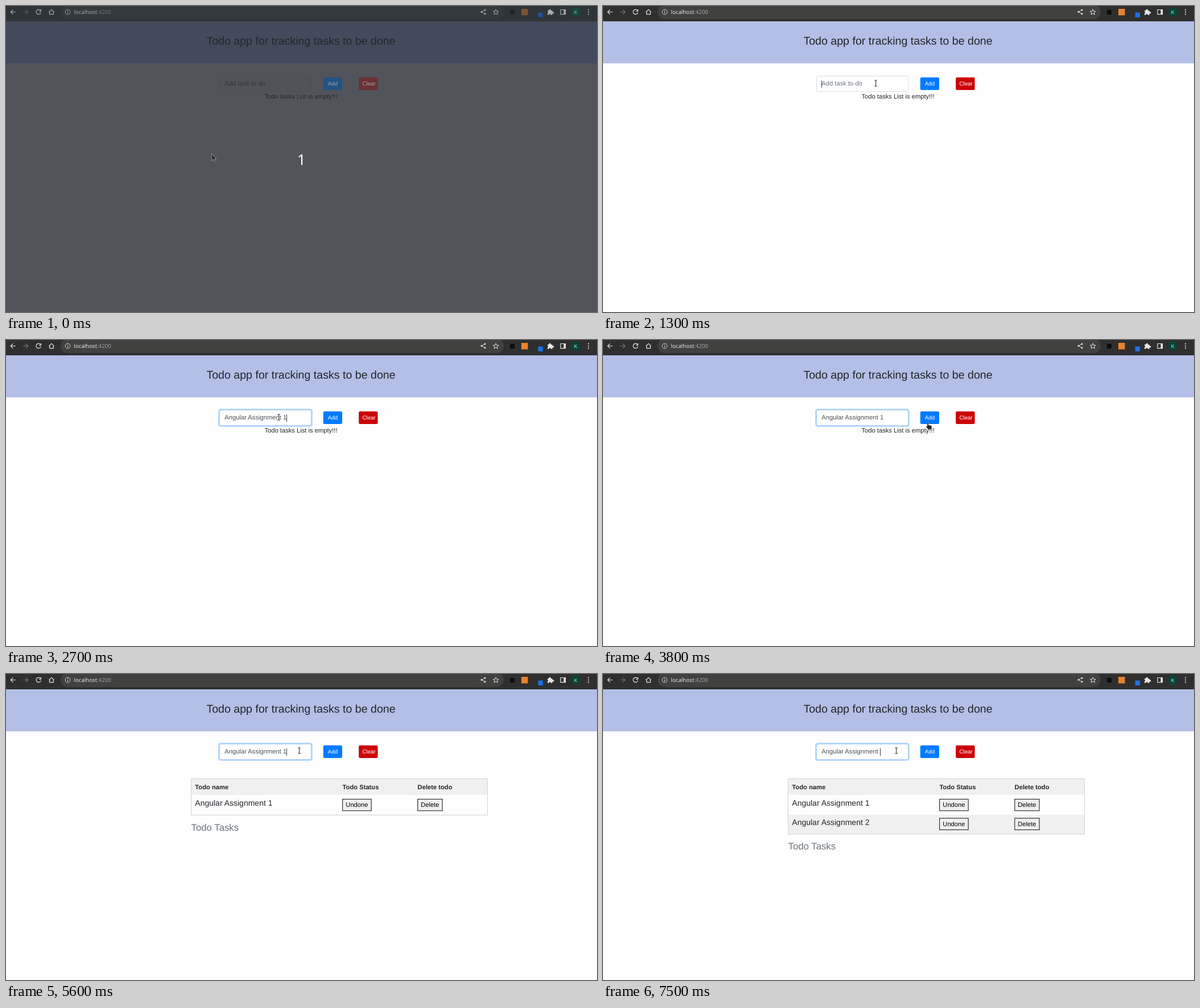
An HTML page for the animation above (8000 ms loop, 1039x539 px).

```html
<!DOCTYPE html>
<html lang="en">
<head>
<meta charset="utf-8">
<title>Todo app</title>
<style>
  html, body { margin: 0; width: 100%; height: 100%; overflow: hidden; }
  svg {
    display: block; width: 100%; height: 100%;
    font: 11.2px "Liberation Sans", Arial, sans-serif;
    text-rendering: geometricPrecision;
    --page: #fefefe; --bar: #2f2f2f; --pill: #414140; --icon: #e6e6e6; --faint: #777;
    --host: #f0f0f0; --port: #a8a8a8; --hero: #b3bfe6; --ink: #212529; --field: #fff;
    --edge: #ced4da; --hint: #6c757d; --add: #007bff; --clear: #cc0408; --label: #fff;
    --orange: #e8822e; --badge: #1a73e8; --avatar: #06463a; --black: #0c0c0c;
  }
  svg.dim {
    --page: #51545b; --bar: #2e3438; --pill: #34393d; --icon: #a9adaf; --faint: #565b5e;
    --host: #a9adaf; --port: #6d7275; --hero: #434a5b; --ink: #25282c; --field: #50535a;
    --edge: #4c4f56; --hint: #32353a; --add: #245284; --clear: #6b3236; --label: #9da3ab;
    --orange: #775438; --badge: #22508e; --avatar: #174840; --black: #202427;
  }
  .page { fill: var(--page); } .bar { fill: var(--bar); } .pill { fill: var(--pill); }
  .hero { fill: var(--hero); } .ink { fill: var(--ink); } .hint { fill: var(--hint); }
  .field { fill: var(--field); stroke: var(--edge); stroke-width: .8; }
  .add { fill: var(--add); } .clear { fill: var(--clear); }
  .label { fill: var(--label); font-size: 9.8px; }
  .line { fill: none; stroke: var(--icon); stroke-width: 1.2; }
  .faint { stroke: var(--faint); }
  .solid { fill: var(--icon); }
  .black { fill: var(--black); } .orange { fill: var(--orange); }
  .badge { fill: var(--badge); } .avatar { fill: var(--avatar); }
  .url { font: 9.7px "Open Sans", "Noto Sans", sans-serif; fill: var(--port); }
  .host { fill: var(--host); }
  .count { font: 26px "Noto Sans", sans-serif; fill: #fff; }
  .mid { text-anchor: middle; }
  .bold { font-weight: bold; }
  .frame { fill: none; stroke: #cfd2d5; }
  .stripe { fill: #f0f0f0; }
  .btn { fill: #efefef; stroke: #222; stroke-width: 1.1; }
  .task { font-size: 14px; }
  .pointer { fill: #2a2a2a; stroke: #fff; stroke-width: .9; stroke-linejoin: round; paint-order: stroke; }
  .halo { fill: none; stroke: #fff; stroke-width: 2.2; opacity: .8; }
  .beam { fill: none; stroke: #333; stroke-width: 1.1; }
</style>
</head>
<body>
<svg id="stage" viewBox="0 0 1039 539">
  <defs>
    <path id="stem" d="M-2.3-5.2Q-.5-5.2 0-4.4 .5-5.2 2.3-5.2M0-4.5V4.5M-2.3 5.2Q-.5 5.2 0 4.4 .5 5.2 2.3 5.2"/>
  </defs>
  <rect class="page" width="1039" height="539"/>

  <rect class="bar" width="1039" height="27"/>
  <rect class="pill" x="96" y="-2" width="779" height="25" rx="12.5"/>
  <path class="line" d="M17 10.5H8.4M12.4 6.3 8.2 10.5 12.4 14.7"/>
  <path class="line faint" d="M30 10.5H38.6M34.6 6.3 38.8 10.5 34.6 14.7"/>
  <path class="line" d="M60.4 7.6A4.2 4.2 0 1 0 61.3 11.5M61.4 5.8V9.2H58"/>
  <path class="line" d="M75.4 10.6 80 6.4 84.6 10.6M76.7 10V14.7H83.3V10"/>
  <circle class="line" cx="108.5" cy="10.5" r="4.4" style="stroke-width:.9"/>
  <path class="line" d="M108.5 10V13M108.5 7.8V8.9" style="stroke-width:1"/>
  <text class="url" x="119.5" y="14"><tspan class="host">localhost</tspan>:4200</text>
  <path class="line" d="M842 7 836 10.3 842 13.7" style="stroke-width:.9"/>
  <g class="solid">
    <circle cx="842" cy="7" r="1.5"/><circle cx="836" cy="10.3" r="1.5"/><circle cx="842" cy="13.7" r="1.5"/>
    <circle cx="1024" cy="6.6" r="1.1"/><circle cx="1024" cy="10.5" r="1.1"/><circle cx="1024" cy="14.4" r="1.1"/>
    <path d="M952 8H954.5A1.8 1.8 0 1 1 958 8H960.5V10.3A1.8 1.8 0 1 1 960.5 13.3V15.8H957.8A1.7 1.7 0 0 0 954.4 15.8H952V13A1.7 1.7 0 0 0 952 9.8Z"/>
    <path d="M980.5 6H984V15H980.5Z"/>
  </g>
  <path class="line" d="M861.2 5.8 862.6 9.1 866.1 9.3 863.4 11.6 864.3 15 861.2 13.1 858.1 15 859 11.6 856.3 9.3 859.8 9.1Z" style="stroke-width:1"/>
  <path class="line" d="M975 6.5H983.5V14.7H975Z"/>
  <rect class="black" x="886" y="7" width="8" height="8"/>
  <rect class="orange" x="906" y="5" width="11.5" height="11.5"/>
  <rect class="badge" x="935.5" y="11.5" width="8.5" height="8.5" rx="1"/>
  <circle class="avatar" cx="1001.5" cy="10.5" r="8"/>
  <text class="solid mid" x="1001.5" y="13.6" style="font-size:8.5px">K</text>

  <rect class="hero" y="27" width="1039" height="74"/>
  <text class="ink mid" x="518.5" y="68" style="font-size:19.6px">Todo app for tracking tasks to be done</text>

  <rect id="inputRing" x="374.2" y="122.2" width="163.6" height="29.6" rx="3.6" fill="none" stroke="#b8daff" stroke-width="2.6"/>
  <rect class="field" x="375.4" y="123.4" width="161.2" height="27.2" rx="2.6"/>
  <rect id="inputEdge" x="375.4" y="123.4" width="161.2" height="27.2" rx="2.6" fill="none" stroke="#9dcbff" stroke-width=".8"/>
  <text id="value" x="384.3" y="140.3"></text>
  <rect id="caret" y="131" width="1" height="13" fill="#333a40"/>
  <rect id="addRing" x="556.2" y="124.2" width="36.4" height="25.6" rx="3.6" fill="#80bdff"/>
  <rect class="add" x="557.8" y="125.8" width="33.2" height="22.2" rx="2.2"/>
  <text class="label mid" x="574.4" y="139.7">Add</text>
  <rect class="clear" x="620.2" y="125.8" width="33.4" height="22.2" rx="2.2"/>
  <text class="label" x="626.4" y="139.7">Clear</text>
  <text id="empty" class="ink mid" x="518.5" y="162.7">Todo tasks List is empty!!!</text>

  <g id="table">
    <rect class="stripe" x="326" y="185" width="520" height="28"/>
    <g class="ink bold">
      <text x="332.3" y="203.3">Todo name</text>
      <text x="591.6" y="203.3">Todo Status</text>
      <text x="723.6" y="203.3">Delete todo</text>
    </g>
    <g id="rows"></g>
    <rect id="frame" class="frame" x="325.5" y="184.5" width="521"/>
    <text id="caption" x="325.5" fill="#6c757d" style="font-size:16.8px">Todo Tasks</text>
  </g>

  <text id="count" class="count mid" x="519.5" y="279.8">1</text>

  <g id="pointer">
    <path id="arrow" class="pointer" d="M0 0V11.5L2.7 9.1 4.5 13 6.4 12.2 4.6 8.4H8Z"/>
    <path id="hand" class="pointer" d="M-1 1q0-1.2 1-1.2t1 1.2V4.5l4.5 .8q1.5 .4 1.3 2L6 12H.5L-3 7.4q-.8-1.2 .6-1.4L-1 6.9Z"/>
    <g id="beam"><use class="halo" href="#stem"/><use class="beam" href="#stem"/></g>
  </g>
</svg>
<script>
const LOOP = 8000, STEP = 100, ROW = 33.6;
const $ = id => document.getElementById(id);
const show = (id, on) => { $(id).style.display = on ? '' : 'none'; };
const clamp = v => Math.min(1, Math.max(0, v));
const smooth = k => k * k * (3 - 2 * k);

const TASK = 'Angular Assignment ';
const stops = [[361.5, 260.5], [479.6, 136], [576.5, 146], [515.6, 135]];
const moves = [[400, 900], [3200, 3900], [4600, 5000]];
const caretOn = [[1300, 1900], [2500, 3300], [3900, 4300], [5500, 6000], [6100, 6800], [7500, 8000]];
const typed = [[0, ''], [2700, TASK + '1'], [6100, TASK], [6200, TASK + '2'], [7500, TASK]];

$('rows').innerHTML = [1, 2].map(n => `
  <g id="row${n}" class="ink" transform="translate(0 ${(n - 1) * ROW})">
    ${n === 2 ? '<rect class="stripe" x="326" y="214.4" width="520" height="34"/>' : ''}
    <text class="task" x="332.3" y="232.2">${TASK}${n}</text>
    <rect class="btn" x="591.6" y="220.5" width="50.6" height="20.3"/>
    <text class="mid" x="616.9" y="234.4" fill="#000">Undone</text>
    <rect class="btn" x="723.8" y="220.5" width="43.3" height="20.3"/>
    <text class="mid" x="745.4" y="234.4" fill="#000">Delete</text>
  </g>`).join('');

function pointerAt(t) {
  let [x, y] = stops[0];
  moves.forEach(([from, to], i) => {
    const k = smooth(clamp((t - from) / (to - from)));
    x += (stops[i + 1][0] - stops[i][0]) * k;
    y += (stops[i + 1][1] - stops[i][1]) * k;
  });
  return [x, y];
}

function drawPointer(t) {
  const [x, y] = pointerAt(t);
  const within = (l, top, r, b) => x > l && x < r && y > top && y < b;
  const kind = within(375, 123, 537, 151) ? 'beam' : within(558, 126, 591, 148) ? 'hand' : 'arrow';
  ['arrow', 'hand', 'beam'].forEach(id => show(id, id === kind));
  $('pointer').setAttribute('transform', `translate(${x} ${y})`);
}

function drawInput(t) {
  const text = typed.filter(([at]) => t >= at).pop()[1];
  $('value').textContent = text || 'Add task to do';
  $('value').setAttribute('class', text ? '' : 'hint');
  $('value').setAttribute('fill', '#495057');
  $('caret').setAttribute('x', !text ? 384 : text === TASK ? 487 : 493);
  show('caret', caretOn.some(([a, b]) => t >= a && t < b));

  const focus = clamp((t - 1300) / 200) - clamp((t - 4200) / 300) + clamp((t - 5400) / 200);
  $('inputRing').style.opacity = $('inputEdge').style.opacity = focus;
  $('addRing').style.opacity = clamp((t - 4200) / 300) - clamp((t - 5400) / 200);
}

function drawTable(t) {
  const rows = t >= 6700 ? 2 : t >= 4300 ? 1 : 0;
  const shift = rows === 2 ? ROW : 0;
  show('empty', !rows);
  show('table', rows);
  show('row2', rows === 2);
  $('frame').setAttribute('height', 64 + shift);
  $('caption').setAttribute('y', 275.8 + shift);
}

function draw(t) {
  $('stage').classList.toggle('dim', t < 100);
  show('count', t < 100);
  drawInput(t);
  drawTable(t);
  drawPointer(t);
}

const start = performance.now();
function tick() {
  const t = (performance.now() - start) % LOOP;
  draw(Math.floor(t / STEP) * STEP);
  requestAnimationFrame(tick);
}
tick();
</script>
</body>
</html>
```
